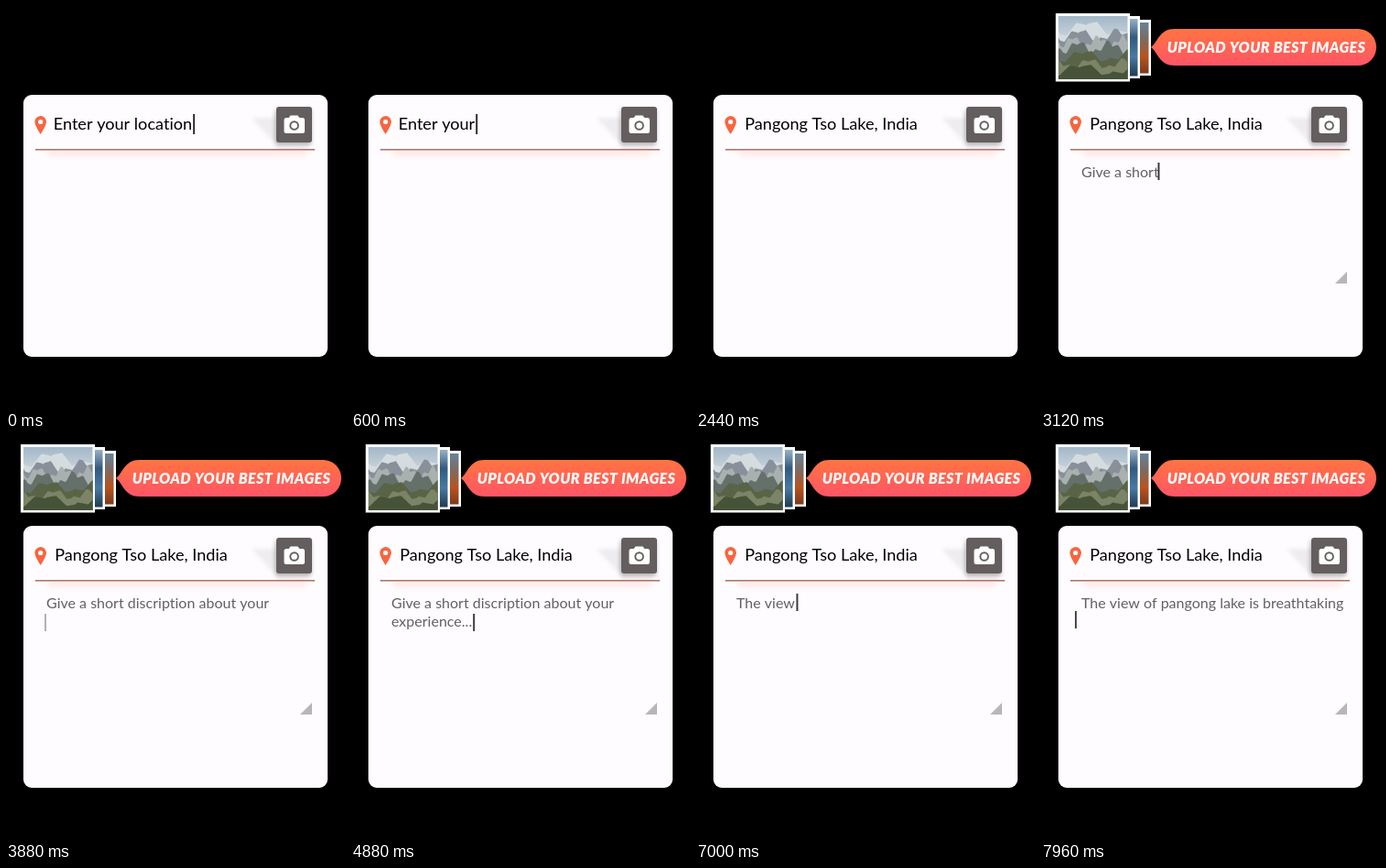
Recreate the animation shown at these times as an HTML page with a canvas. Size 370x440 px, loop 8000 ms.

```html
<!DOCTYPE html>
<html lang="en">
<head>
<meta charset="utf-8">
<title>Travel post form</title>
<style>
  html, body { margin: 0; width: 100%; height: 100%; overflow: hidden; background: #000; }
  canvas { display: block; }
</style>
</head>
<body>
<canvas id="stage" width="370" height="440"></canvas>
<script>
const ctx = document.getElementById('stage').getContext('2d');
const LOOP = 8000;
const SPEED = 0.45;  // caret travel while typing or erasing, px per ms
const FADE = 400;    // half of a caret blink, ms
const PAPER = '#fffcff', ORANGE = '#f6663f', BUTTON = '#645e5e';

const PLACE = { font: '18.1px Lato, sans-serif', color: '#000', caret: '#2e2b2e', height: 22 };
const NOTE = { font: '16px Lato, sans-serif', color: '#626064', caret: '#3c383c', height: 19 };

// from/to: lifetime, which also starts the blink; type/erase: when the caret sets off; left: its rest position.
const lines = [
  { style: PLACE, text: 'Enter your location', left: 51, x: 51.7, y: 135, top: 118,
    from: -FADE, to: 860, type: -FADE, erase: 450 },
  { style: PLACE, text: 'Pangong Tso Lake, India', left: 51, x: 53.2, y: 135, top: 118,
    from: 870, to: LOOP, type: 1590, erase: Infinity },
  { style: NOTE, text: 'Give a short discription about your', left: 38, x: 44, y: 187, top: 171,
    from: 2640, to: 6800, type: 2920, erase: 5760 },
  { style: NOTE, text: 'experience...', left: 43, x: 44, y: 207, top: 193,
    from: 3720, to: 5760, type: 4140, erase: 5120 },
  { style: NOTE, text: 'The view of pangong lake is breathtaking', left: 38, x: 44, y: 187, top: 171,
    from: 6800, to: LOOP, type: 6840, erase: Infinity },
  { style: NOTE, text: '', left: 38, x: 38, y: 207, top: 190,
    from: 7620, to: LOOP, type: LOOP, erase: Infinity }
];

const clamp = (v, min, max) => Math.max(min, Math.min(max, v));
const zigzag = u => 1 - Math.abs(1 - 2 * (u - Math.floor(u)));

function setFont(font, spacing) {
  ctx.font = font;
  ctx.letterSpacing = spacing;
}

function rect(color, x, y, w, h, r = 0) {
  ctx.fillStyle = color;
  ctx.beginPath();
  ctx.roundRect(x, y, w, h, r);
  ctx.fill();
}

function poly(color, ...points) {
  ctx.fillStyle = color;
  ctx.beginPath();
  for (let i = 0; i < points.length; i += 2) ctx.lineTo(points[i], points[i + 1]);
  ctx.fill();
}

function gradient(y0, y1, ...colors) {
  const g = ctx.createLinearGradient(0, y0, 0, y1);
  colors.forEach((c, i) => g.addColorStop(i / (colors.length - 1), c));
  return g;
}

function drawPin() {
  ctx.fillStyle = ORANGE;
  ctx.beginPath();
  ctx.arc(37.7, 126.4, 6.3, Math.PI * .9, Math.PI * .1);
  ctx.quadraticCurveTo(42.5, 133, 37.7, 140);
  ctx.quadraticCurveTo(33, 133, 31.7, 128.3);
  ctx.fill();
  rect(PAPER, 35.1, 123.9, 5.2, 5.2, 2.6);
}

function drawCamera() {
  ctx.save();
  ctx.filter = 'blur(2px)';
  poly('rgba(80,95,90,.1)', 268, 122, 297, 122, 297, 150, 290, 146);
  ctx.filter = 'none';
  ctx.shadowColor = 'rgba(0,0,0,.3)';
  ctx.shadowBlur = 5;
  ctx.shadowOffsetX = -1;
  ctx.shadowOffsetY = 3;
  rect(BUTTON, 295, 110, 39, 39, 3);
  ctx.restore();
  rect('#fff', 303.5, 122, 22.5, 17, 2.5);
  poly('#fff', 308, 123, 310.5, 119.5, 318.5, 119.5, 321, 123);
  ctx.strokeStyle = BUTTON;
  ctx.lineWidth = 1.9;
  ctx.beginPath();
  ctx.arc(314.6, 130.5, 4.3, 0, 7);
  ctx.stroke();
}

function drawCard() {
  rect(PAPER, 19, 97, 332, 286, 9);
  ctx.save();
  ctx.filter = 'blur(3px)';
  rect('rgba(255,130,90,.14)', 46, 155, 282, 9);
  ctx.restore();
  rect(PAPER, 32, 140, 263, 16);
  rect('#8b8384', 32, 156, 305, 1);
  rect('#f3a08c', 32, 157, 305, 1);
  drawPin();
  drawCamera();
}

function ridge(color, base, height, length, phase) {
  ctx.fillStyle = color;
  ctx.beginPath();
  ctx.moveTo(19, 81);
  for (let x = 19; x <= 96; x++) {
    const u = x / length + phase;
    ctx.lineTo(x, base - height * (.65 * zigzag(u) + .35 * zigzag(u * 2.7)));
  }
  ctx.lineTo(96, 81);
  ctx.fill();
}

function photo(x, y, w, h, fill) {
  rect('#fff', x, y, w, h);
  rect(fill, x + 3, y + 3, w - 5.5, h - 5.5);
}

function drawPhotos() {
  photo(60, 15, 60, 61, gradient(17, 74, '#64859c', '#7d6a62', '#b9531f', '#7a3a1c'));
  photo(40, 11, 68, 68, gradient(13, 77, '#9db6cb', '#33597e', '#4a79a0', '#1f3950'));
  photo(16, 8, 81, 74.5, gradient(11, 40, '#a3b8c9', '#cfd8de'));
  ctx.save();
  ctx.beginPath();
  ctx.rect(19, 11, 75.5, 69);
  ctx.clip();
  ridge('#d5dce0', 36, 24, 60, .65);
  ridge('#88919a', 42, 20, 42, .5);
  ridge('#a9b0b0', 48, 18, 27, .2);
  ridge('#66706b', 55, 20, 34, .3);
  ridge('#596447', 64, 19, 52, .6);
  ridge('#7b8466', 71, 16, 38, .1);
  ridge('#465338', 79, 19, 63, .8);
  ctx.restore();
}

function drawBadge() {
  ctx.fillStyle = gradient(25, 65, '#ff7440', '#ff5567');
  ctx.beginPath();
  ctx.moveTo(120, 45);
  ctx.bezierCurveTo(128, 39, 129, 25, 146, 25);
  ctx.arc(346, 45, 20, -Math.PI / 2, Math.PI / 2);
  ctx.lineTo(146, 65);
  ctx.bezierCurveTo(129, 65, 128, 51, 120, 45);
  ctx.fill();
  ctx.fillStyle = '#fff';
  setFont('italic 900 16px Lato, sans-serif', '0.4px');
  ctx.textAlign = 'center';
  ctx.fillText('UPLOAD YOUR BEST IMAGES', 246, 51);
  ctx.textAlign = 'left';
}

function caretAlpha(line, t, moving) {
  return moving ? 1 : clamp(zigzag((t - line.from) / (2 * FADE)) * 1.2 - .1, 0, 1);
}

function drawLine(line, t, hasCaret) {
  const { style, text, left, x, y, top } = line;
  // A hair of letter spacing switches ligatures off.
  setFont(style.font, '0.01px');
  const reach = text ? x + ctx.measureText(text).width + 2 - left : 0;
  const typed = (t - line.type) * SPEED;
  const kept = reach - Math.max(0, t - line.erase) * SPEED;
  const travel = Math.min(typed, kept);
  const caretX = left + clamp(travel, 0, reach);

  ctx.save();
  ctx.beginPath();
  ctx.rect(44, top - 4, Math.max(0, caretX - 44), style.height + 8);
  ctx.clip();
  ctx.fillStyle = style.color;
  ctx.fillText(text, x, y);
  ctx.restore();

  if (!hasCaret) return;
  ctx.save();
  ctx.globalAlpha = caretAlpha(line, t, travel > 0 && travel < reach);
  rect(style.caret, caretX - 1, top, 2, style.height);
  ctx.restore();
}

function draw(t) {
  rect('#000', 0, 0, 370, 440);
  drawCard();
  ctx.save();
  ctx.globalAlpha = clamp((t - 2500) / 140, 0, 1);
  drawPhotos();
  drawBadge();
  poly('#b9b6ba', 334, 290, 334, 303, 321, 303);
  ctx.restore();
  const visible = lines.filter(line => t >= line.from && t < line.to);
  visible.forEach((line, i) => drawLine(line, t, i === visible.length - 1));
}

const start = performance.now();
function tick() {
  draw((performance.now() - start) % LOOP);
  requestAnimationFrame(tick);
}
tick();
</script>
</body>
</html>
```
